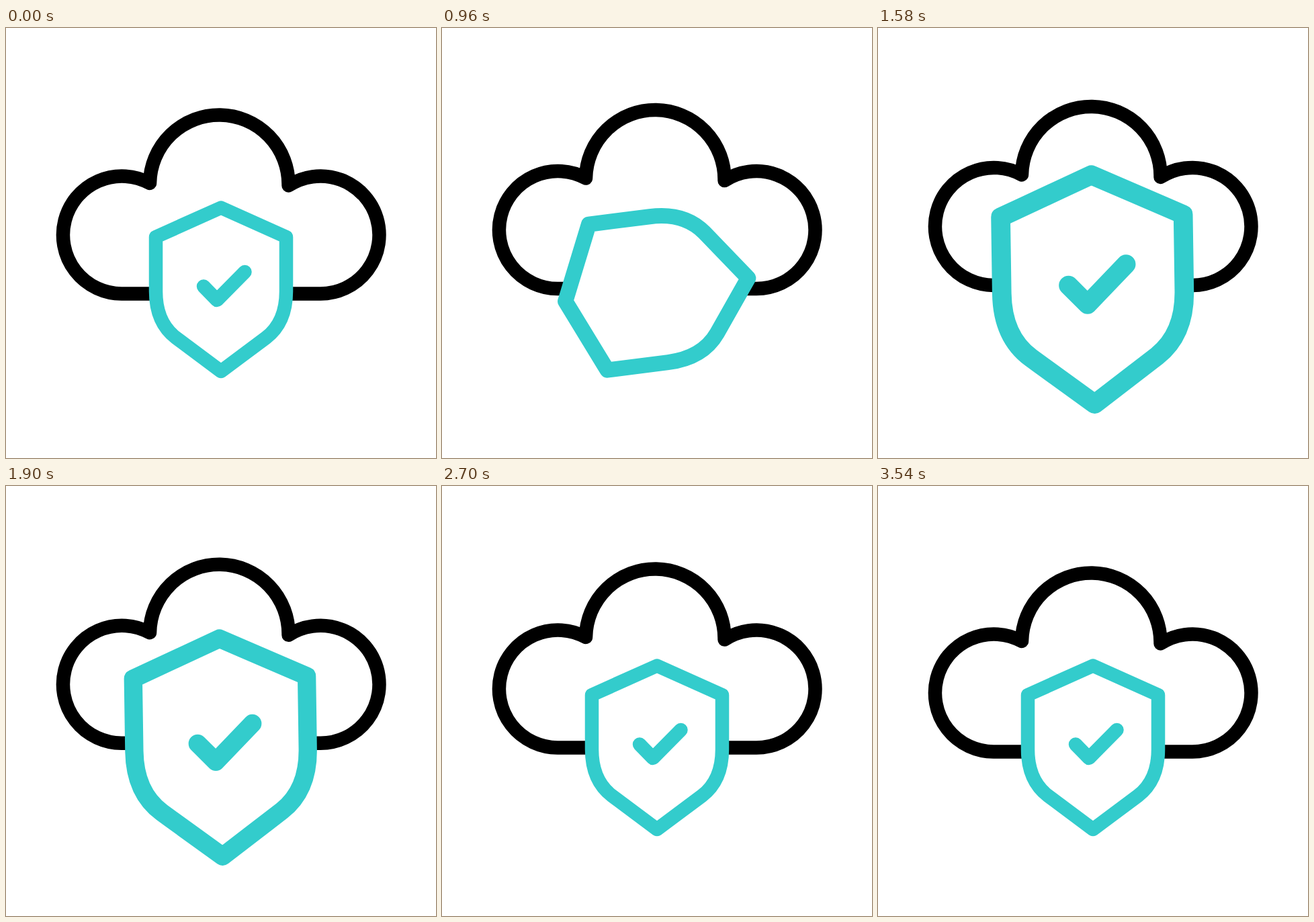
Write an HTML page that moves like this. It is 640x640 px and loops after 3600 ms.

```html
<!DOCTYPE html>
<html lang="en">
<head>
<meta charset="utf-8">
<title>Cloud security</title>
<style>
  html, body { margin: 0; width: 100%; height: 100%; overflow: hidden; background: #fff; }
  svg { display: block; width: 100%; height: 100%; }
  path { fill: none; stroke: #3cc; stroke-width: 20.5; stroke-linecap: round; stroke-linejoin: round; }
  #cloud { stroke: #000; }
  #outline { fill: #fff; }
</style>
</head>
<body>
<svg viewBox="0 0 640 640">
  <path id="cloud" d="M172 395.5A87.5 87.5 0 1 1 214 231A103.2 103.2 0 0 1 420.5 234.5A87.5 87.5 0 1 1 468 395.5Z"/>
  <g id="shield">
    <path id="outline" d="M320 267.5L417 311V392C417 421 408 445 387 461L320 511L253 461C232 445 223 421 223 392V311Z"/>
    <path id="check" pathLength="1" d="M294 384.5L314 405L355.5 363"/>
  </g>
</svg>
<script>
const LOOP = 3600;
const [cloud, shield, check] = ['cloud', 'shield', 'check'].map(id => document.getElementById(id));

// Ease in and out, equal to cubic-bezier(.5, 0, .5, 1)
function ease(x) {
  let low = 0, high = 1;
  for (let i = 0; i < 24; i++) {
    const s = (low + high) / 2;
    if (1.5 * s * (1 - s) + s ** 3 < x) low = s; else high = s;
  }
  return low * low * (3 - 2 * low);
}

// Eased progress from 0 to 1 between two times
function ramp(t, start, end) {
  if (t <= start) return 0;
  if (t >= end) return 1;
  return ease((t - start) / (end - start));
}

function draw(now) {
  const t = now % LOOP;

  const lift = 12.8 * (ramp(t, 0, 1780) - ramp(t, 1780, 3560));
  cloud.setAttribute('transform', `translate(0 ${-lift})`);

  const scale = 1 + 0.4 * (ramp(t, 540, 1580) - ramp(t, 1580, 2620));
  const angle = -360.85 * ramp(t, 735, 1335) + 0.85 * ramp(t, 2180, 2620);
  shield.setAttribute('transform',
    `translate(320 389.5) rotate(${angle}) scale(${scale}) translate(-320 -389.5)`);

  const drawn = 1 - ramp(t, 0, 540) + ramp(t, 1070, 1580);
  check.style.visibility = drawn > 0.001 ? 'visible' : 'hidden';
  check.style.strokeDasharray = drawn > 0.999 ? 'none' : `${drawn} 2`;
}

const begin = performance.now();
function tick() {
  draw(performance.now() - begin);
  requestAnimationFrame(tick);
}
tick();
</script>
</body>
</html>
```
